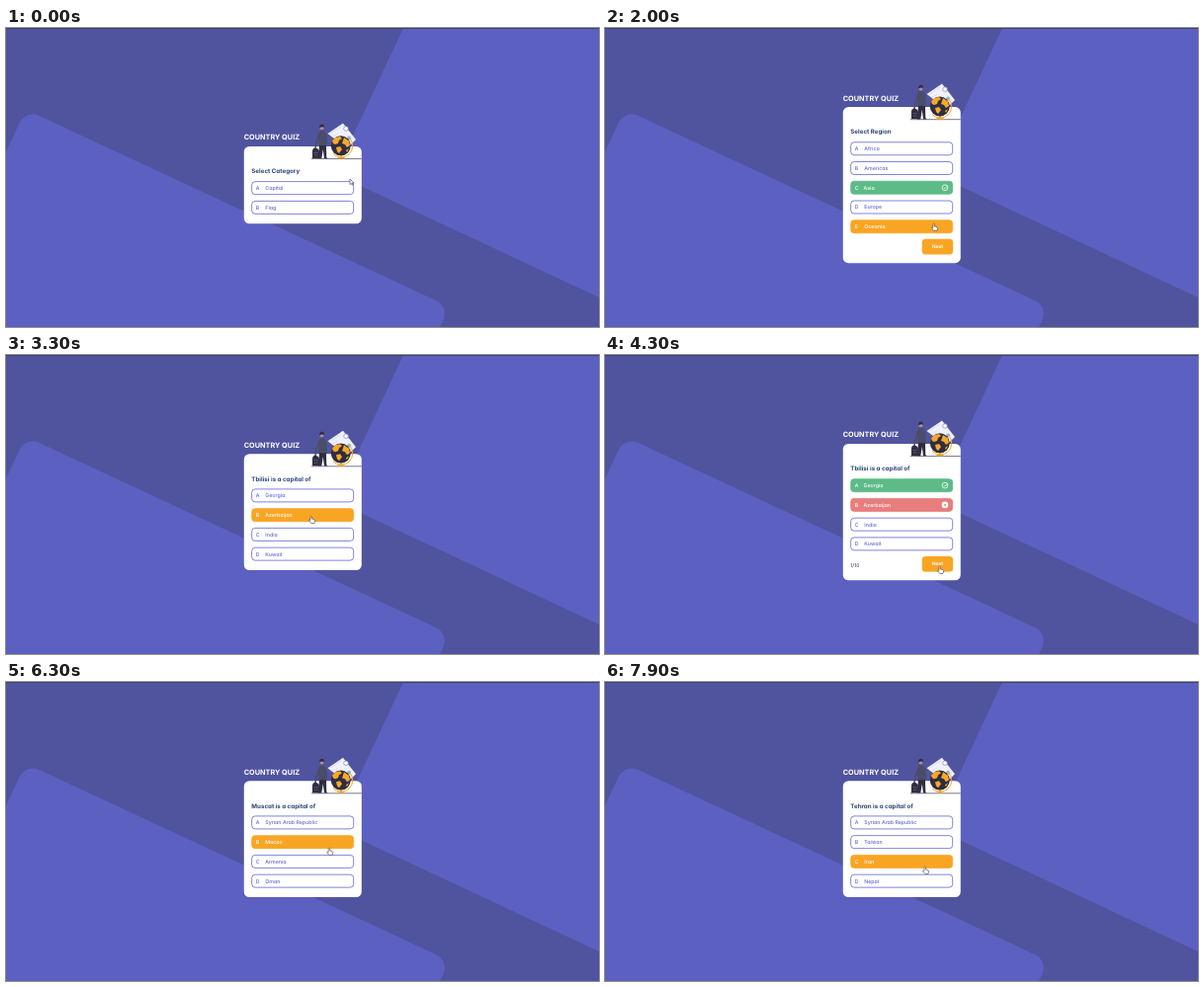
Recreate the animation shown at these times as an HTML page. Size 600 px wide and 303 px high, loop 8000 ms.

```html
<!DOCTYPE html>
<html lang="en">
<head>
<meta charset="utf-8">
<title>Country quiz</title>
<style>
html, body { margin: 0; width: 100%; height: 100%; overflow: hidden; background: #50549f; }
svg { display: block; width: 600px; height: 303px; }
text { font: 500 5.25px Inter, "Open Sans", sans-serif; font-feature-settings: "cv11"; text-rendering: geometricPrecision; }
.title { font-size: 7.3px; font-weight: 700; fill: #fff; }
.head { font-size: 6.2px; font-weight: 700; fill: #2a4476; }
.next { font-size: 4.8px; font-weight: 700; fill: #fff; text-anchor: middle; }
.count { font-size: 5px; fill: #3b4a74; }
</style>
</head>
<body>
<svg viewBox="0 0 600 303">
  <rect width="600" height="303" fill="#50549f"/>
  <g fill="#5c60c1">
    <rect width="473" height="400" rx="15" transform="translate(20 82.6) rotate(25)"/>
    <path d="M402 0L333 148L600 273V0Z"/>
  </g>
  <rect width="600" height="1" fill="#3f4272"/>
  <g id="quiz"></g>

  <defs>
    <!-- y = 0 is the top edge of the card -->
    <g id="art">
      <path d="M325.5-13L341-23.5L354-7L345 2Z" fill="#f1f1fb"/>
      <path d="M328-13L339-20M331-10L336-13M347-10L351-7" stroke="#d3d4ee" stroke-width=".7"/>
      <circle cx="344" cy="-18" r="2.3" fill="#fff" stroke="#7c80d3" stroke-width=".7"/>
      <circle cx="347" cy="-8.5" r="2" fill="#8ab9cb"/>
      <path d="M309 12.6H359.7" stroke="#3f3d56" stroke-width=".7"/>
      <path d="M347.5-8.5A11.4 11.4 0 0 1 331 7.5" fill="none" stroke="#f9a826" stroke-width="1"/>
      <path d="M338 9H340V11H342.5V12.4H335.5V11H338Z" fill="#f9a826"/>
      <circle cx="338.8" cy="-.6" r="10" fill="#2f2e41"/>
      <path d="M330-5.5L333-9L338-10L340-8L337-6L336-3L333-2L331-3ZM342-9L347-5.5L348-1L345 1L343-2L340-3L341-6ZM334 1L338 0L340 3L337 7L335 5ZM344 4L347 2L345 6Z" fill="#f9a826"/>
      <path d="M316-12.5L318-16H321.5L324.5-12L325-3L323.5 0H316.5Z" fill="#4b4d68"/>
      <path d="M317-1H324L324.3 11L325.5 12.3H322L320.8 3L319.3 12.3H315.8Z" fill="#2f2e41"/>
      <path d="M316.4-12L314-4L313 2" fill="none" stroke="#4b4d68" stroke-width="1.6"/>
      <circle cx="319.5" cy="-18.6" r="2" fill="#b4899a"/>
      <path d="M317-18.6Q317-22.6 319.8-22.4Q322.3-22 321.8-19Q320-20.4 317-18.6Z" fill="#2f2e41"/>
      <path d="M310 12V5Q310 1.5 313 1.5Q317 2 317 6V12Z" fill="#2f2e41"/>
      <path d="M311 6.5H316M311.5 9H315.5" stroke="#6d6b86" stroke-width=".6"/>
    </g>
    <path id="arrow" d="M0 0V5.6L1.3 4.4L2.2 6.3L3.1 5.9L2.3 4.1H4Z" fill="#fff" stroke="#222" stroke-width=".5"/>
    <path id="hand" d="M0 .6Q.7-.4 1.4.6V3L4 3.6Q4.8 4 4.6 5L4 7.5H.8L-1.4 4.8Q-1.5 3.8-.6 4L0 4.5Z" fill="#fff" stroke="#222" stroke-width=".5"/>
  </defs>
</svg>

<script>
const LOOP = 8000, STEP = 100;
const ROW_TOP = 35.3, PITCH = 19.75, ROW_H = 13.8;
const BLUE = '#6066d0', ORANGE = '#f9a524', GREEN = '#5cbb87', RED = '#e87d7d';

// at: shown, answered: option picked, right / wrong: option indexes
const screens = [
  { at: 0, answered: 500, right: 0, head: 'Select Category', options: ['Capital', 'Flag'] },
  { at: 1000, answered: 1500, right: 2, head: 'Select Region', options: ['Africa', 'Americas', 'Asia', 'Europe', 'Oceania'] },
  { at: 2400, answered: 3500, right: 0, wrong: 1, count: 1, head: 'Tbilisi is a capital of', options: ['Georgia', 'Azerbaijan', 'India', 'Kuwait'] },
  { at: 4500, answered: 5100, right: 2, count: 2, head: 'Ankara is a capital of', options: ['Saudi Arabia', 'Bangladesh', 'Turkey', 'Viet Nam'] },
  { at: 5900, answered: 6500, right: 3, wrong: 1, count: 3, head: 'Muscat is a capital of', options: ['Syrian Arab Republic', 'Macao', 'Armenia', 'Oman'] },
  { at: 7200, answered: Infinity, head: 'Tehran is a capital of', options: ['Syrian Arab Republic', 'Taiwan', 'Iran', 'Nepal'] }
];

// Pointer stops: time, x, y
const stops = [
  [0, 348, 153], [300, 335, 163], [500, 334, 163], [900, 337, 192], [1000, 337, 192],
  [1400, 331, 172], [1500, 331, 172], [2000, 332, 198], [2300, 336, 220], [2400, 336, 220],
  [2700, 331, 99], [2800, 315, 100], [2950, 315, 100], [3300, 308, 163], [3700, 308, 163],
  [4300, 338, 214], [4600, 338, 214], [5000, 318, 182], [5100, 318, 182], [5400, 312, 186],
  [5700, 337, 211], [5900, 337, 211], [6400, 325, 163], [6600, 325, 163], [7100, 336, 209],
  [7300, 336, 209], [7800, 323, 187], [LOOP, 323, 187]
];

function pointer(t) {
  const i = stops.findIndex(s => s[0] > t);
  const [t0, x0, y0] = stops[i - 1], [t1, x1, y1] = stops[i];
  const p = (t - t0) / (t1 - t0), e = p * p * (3 - 2 * p);
  return [x0 + (x1 - x0) * e, y0 + (y1 - y0) * e];
}

const label = (cls, x, y, s, fill) =>
  `<text class="${cls}" x="${x}" y="${y}"${fill ? ` fill="${fill}"` : ''}>${s}</text>`;

function icon(y, right) {
  return right
    ? `<g fill="none" stroke="#fff" stroke-width=".8"><circle cx="344" cy="${y}" r="2.9"/><path d="M342.6 ${y}l1.1 1.1l2.6-2.8"/></g>`
    : `<circle cx="344" cy="${y}" r="3.3" fill="#fff"/><path d="M342.8 ${y - 1.2}l2.4 2.4m0-2.4l-2.4 2.4" stroke="${RED}" stroke-width=".8"/>`;
}

function option(name, i, y, mark, hover) {
  const fill = mark || (hover ? ORANGE : '#fff');
  const ink = mark || hover ? '#fff' : BLUE;
  const edge = mark || (hover ? ORANGE : BLUE);
  const mid = y + ROW_H / 2;
  return `<rect x="248.7" y="${y + .4}" width="103" height="${ROW_H - .8}" rx="3.4" fill="${fill}" stroke="${edge}" stroke-width=".8"/>`
    + label('', 252.8, mid + 1.9, 'ABCDE'[i], ink)
    + label('', mark ? 261.6 : 262.3, mid + 1.9, name, ink)
    + (mark ? icon(mid, mark === GREEN) : '');
}

function draw(t) {
  const s = screens.findLast(s => s.at <= t);
  const done = t >= s.answered, n = s.options.length;
  const height = ROW_TOP + n * PITCH + 3.5 + (done ? 20.5 : 0);
  const top = 159.1 - height / 2;
  const rows = top + ROW_TOP, nextY = rows + n * PITCH - .3;
  const [x, y] = pointer(t);
  const inside = (y0, h, x0) => x > x0 && x < 352 && y >= y0 && y <= y0 + h;
  let hand = false;

  let out = label('title', 240.7, top - 6.5, 'COUNTRY QUIZ')
    + `<rect x="240.8" y="${top}" width="119" height="${height}" rx="5.5" fill="#fff"/>`
    + `<use href="#art" y="${top}"/>`
    + label('head', 248.3, top + 27.3, s.head);

  s.options.forEach((name, i) => {
    const rowY = rows + i * PITCH, hover = inside(rowY, ROW_H, 248);
    const mark = done && (i === s.right ? GREEN : i === s.wrong ? RED : '');
    hand ||= hover;
    out += option(name, i, rowY, mark, hover);
  });

  if (done) {
    hand ||= inside(nextY, 15.5, 321);
    out += `<rect x="320.8" y="${nextY + .6}" width="31.3" height="15.5" rx="3.5" fill="${ORANGE}" opacity=".35"/>`
      + `<rect x="320.8" y="${nextY}" width="31.3" height="15.5" rx="3.5" fill="${ORANGE}"/>`
      + label('next', 336.5, nextY + 9.4, 'Next');
    if (s.count) out += label('count', 248.3, nextY + 11.4, s.count + '/10');
  }

  out += `<use href="#${hand ? 'hand' : 'arrow'}" x="${x}" y="${y}"/>`;
  document.getElementById('quiz').innerHTML = out;
}

const start = performance.now();
let last = -1;
function tick() {
  const t = Math.floor((performance.now() - start) % LOOP / STEP) * STEP;
  if (t !== last) draw(last = t);
  requestAnimationFrame(tick);
}
tick();
</script>
</body>
</html>
```
